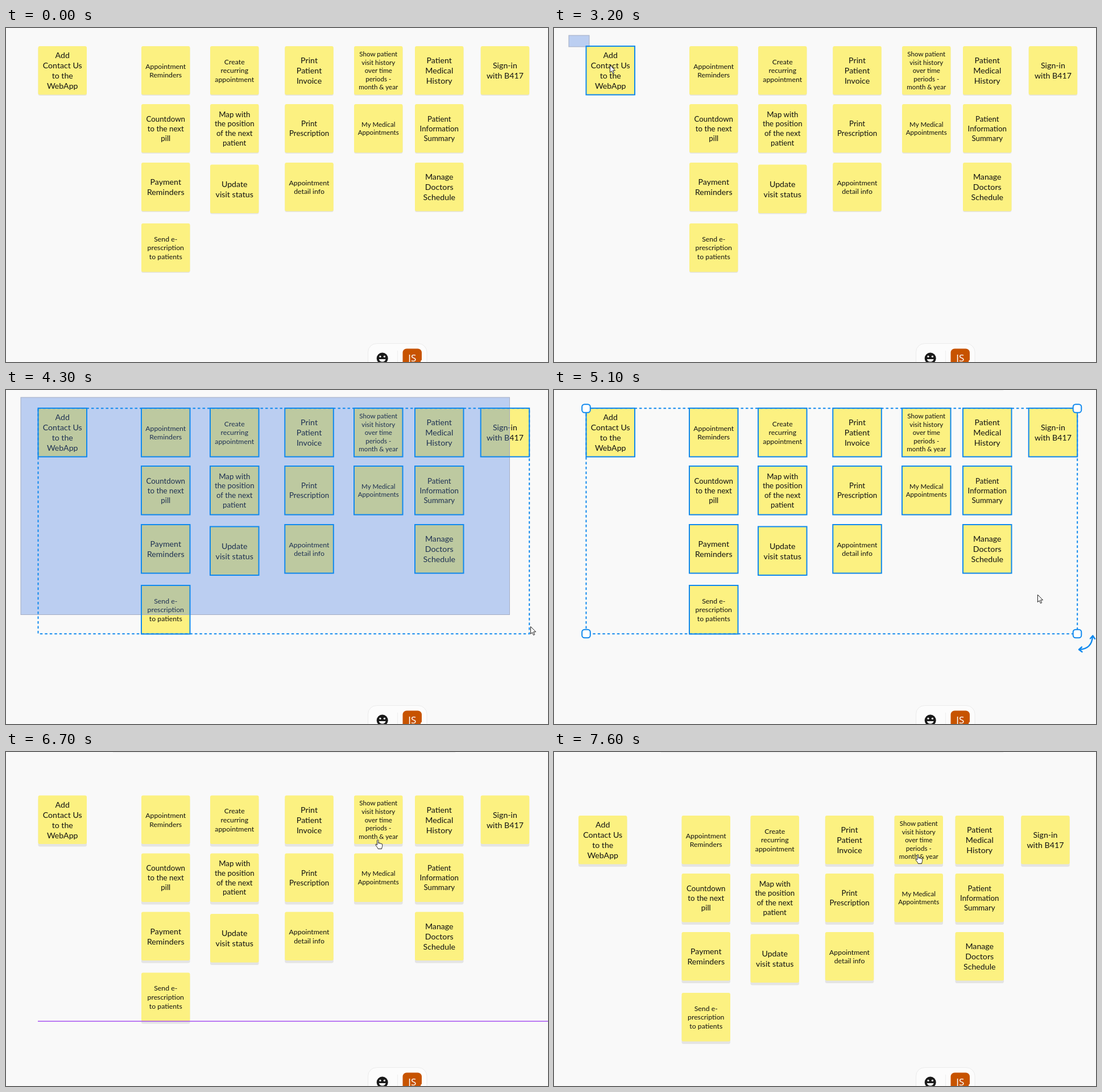
An HTML page that plays this animation: 953x588 px, repeating every 8000 ms.

```html
<!DOCTYPE html>
<html lang="en">
<head>
<meta charset="utf-8">
<title>Sticky note board</title>
<style>
  html, body { margin: 0; width: 100%; height: 100%; overflow: hidden; background: #f9f9f9; }
  svg { display: block; width: 953px; height: 588px; }
  text { font-family: Lato, "Open Sans", sans-serif; text-anchor: middle; fill: #111; }
  .note { fill: #fcf181; }
  .shade { fill: #e4e4e4; }
  .outline { fill: none; stroke: #1089ee; stroke-width: 2; }
  .outline.hover { stroke: #7fbdf3; }
  #group { fill: none; stroke: #1089ee; stroke-width: 2; stroke-dasharray: 4.5 4; }
  #marquee { fill: rgba(58, 115, 224, .32); stroke: #a4adc4; }
  #handles rect { fill: #fff; stroke: #1089ee; stroke-width: 2; }
  #turn { fill: none; stroke: #1089ee; stroke-width: 2.4; stroke-linecap: round; stroke-linejoin: round; }
  .cursor { fill: #fff; stroke: #222; stroke-width: 1; stroke-linejoin: round; }
  .initials { font: 17px "Noto Sans", "Open Sans", sans-serif; fill: #fff; }
</style>
</head>
<body>
<svg viewBox="0 0 953 588">
  <path id="topbar" d="M188 .5H790" stroke="#ececec" stroke-width="1.5"/>
  <g id="board"></g>

  <g id="toolbar">
    <rect x="636.5" y="555.5" width="103.5" height="60" rx="15" fill="#fcfcfc" stroke="#ebebeb"/>
    <path d="M688.5 568V588" stroke="#eee"/>
    <circle cx="661.7" cy="581.5" r="10" fill="#1a1a1a"/>
    <g fill="#fff">
      <circle cx="658" cy="578.3" r="1.6"/>
      <circle cx="665.4" cy="578.3" r="1.6"/>
      <path d="M655.8 583H667.6A6 5.4 0 0 1 655.8 583Z"/>
    </g>
    <rect x="697.5" y="564.5" width="33.5" height="34" rx="7" fill="#c75300"/>
    <circle cx="733" cy="588" r="4" fill="#fcfcfc"/>
    <text class="initials" x="714.3" y="587">JS</text>
  </g>

  <rect id="marquee"/>
  <g id="outlines"></g>
  <rect id="group"/>
  <g id="handles">
    <path id="turn" d="M923.5 457Q946 456 947 433M928 452.5L923 457L928.5 461M943 437.5L947.3 432.5L951 438"/>
  </g>
  <path id="guide" d="M56 474H953" stroke="#a64ff0" stroke-width="1.6"/>
  <path id="arrow" class="cursor" d="M.5 .5V13.5L3.4 10.7L5.5 15.5L7.6 14.6L5.5 9.8H9.6Z"/>
  <path id="hand" class="cursor" d="M3.5 10V1.8a1.2 1.2 0 0 1 2.4 0V7a1.2 1.2 0 0 1 2.4 0v.5a1.2 1.2 0 0 1 2.3 .2v.5a1.1 1.1 0 0 1 2.1 .3V11.5c0 2 -1 2.5 -1.2 5H5.2C5 14.5 2 12 .9 9.5c-.5 -1.3 1 -2 1.8 -.9Z"/>
</svg>

<script>
const LOOP = 8000, STEP = 100, SIDE = 85.5;
const $ = id => document.getElementById(id);

// Text sizes: [font size, line height]
const SIZES = { L: [14.2, 18], M: [13.3, 16.8], S: [12.3, 15.7], XS: [11.6, 14.6] };

const NOTES = [
  [56.5, 32, 'L', 'Add|Contact Us|to the|WebApp'],
  [238, 32, 'S', 'Appointment|Reminders'],
  [238, 134, 'M', 'Countdown|to the next|pill'],
  [238, 237, 'L', 'Payment|Reminders'],
  [238, 344, 'S', 'Send e-|prescription|to patients'],
  [359, 32, 'S', 'Create|recurring|appointment'],
  [359, 134, 'M', 'Map with|the position|of the next|patient'],
  [359, 240.5, 'L', 'Update|visit status'],
  [490.3, 32, 'L', 'Print|Patient|Invoice'],
  [490.3, 134, 'M', 'Print|Prescription'],
  [490.3, 237, 'S', 'Appointment|detail info'],
  [612, 32, 'XS', 'Show patient|visit history|over time|periods -|month & year'],
  [612, 134, 'XS', 'My Medical|Appointments'],
  [719, 32, 'L', 'Patient|Medical|History'],
  [719, 134, 'M', 'Patient|Information|Summary'],
  [719, 237, 'L', 'Manage|Doctors|Schedule'],
  [834.7, 32, 'L', 'Sign-in|with B417']
].map(([x, y, size, label]) => ({ x, y, size, lines: label.split('|') }));

// Keys: time, x, y
const POINTER = [
  [0, 900, 299], [700, 900, 299], [1000, 858, 350], [1100, 858, 350],
  [1300, 836, 362], [1500, 836, 362], [1600, 690, 315], [1700, 300, 190],
  [1800, 103, 128], [2000, 88, 96], [2300, 17, 19], [2400, 21, 16],
  [2700, 26, 13], [2800, 26, 13], [3000, 42, 21], [3100, 62, 33],
  [3200, 98, 65], [3600, 395, 230], [3700, 469, 269], [4200, 885.5, 395.5],
  [4300, 922, 416], [4600, 934, 426], [4700, 935, 427], [5000, 935, 427],
  [5100, 850, 360], [5500, 645, 107], [5600, 645, 107], [5800, 649, 100],
  [6000, 649, 100], [6700, 649, 154], [6900, 646, 168], [7300, 631, 179],
  [7600, 635, 180]
];
const SHIFT = [
  [6000, 0, 0], [6200, 0, 4], [6600, 0, 38], [6700, 0, 44.5], [6900, -3, 62],
  [7100, -12, 73], [7300, -17, 78], [7600, -13.5, 80]
];

function make(tag, attrs, parent) {
  const el = document.createElementNS('http://www.w3.org/2000/svg', tag);
  set(el, attrs);
  return parent.appendChild(el);
}

function set(el, attrs) {
  for (const k in attrs) el.setAttribute(k, attrs[k]);
}

function show(el, on) {
  el.style.display = on ? '' : 'none';
}

function track(keys, t) {
  const i = keys.findIndex(k => k[0] > t);
  if (i < 0) return keys[keys.length - 1].slice(1);
  if (i === 0) return keys[0].slice(1);
  const a = keys[i - 1], b = keys[i], f = (t - a[0]) / (b[0] - a[0]);
  return [a[1] + (b[1] - a[1]) * f, a[2] + (b[2] - a[2]) * f];
}

for (const n of NOTES) {
  const box = { x: n.x, y: n.y, width: SIDE, height: SIDE };
  const [size, lead] = SIZES[n.size];
  n.shade = make('rect', { ...box, rx: 3, class: 'shade' }, $('board'));
  make('rect', { ...box, rx: 3, class: 'note' }, $('board'));
  n.lines.forEach((line, i) => {
    const mid = n.y + SIDE / 2 + .3 + (i - (n.lines.length - 1) / 2) * lead;
    const el = make('text', { x: n.x + SIDE / 2, y: mid + size * .35, 'font-size': size }, $('board'));
    el.textContent = line;
  });
  n.outline = make('rect', { ...box, class: 'outline' }, $('outlines'));
}

for (const x of [56.5, 920]) for (const y of [32.5, 429])
  make('rect', { x: x - 7.3, y: y - 7.3, width: 14.6, height: 14.6, rx: 4.5 }, $('handles'));

function draw(t) {
  const between = (a, b) => t >= a && t < b;
  const dragging = t >= 6100;

  const [dx, dy] = track(SHIFT, t);
  set($('board'), { transform: `translate(${dx} ${dy})` });

  // The marquee trails the pointer by one step.
  const [mx, my] = track(POINTER, t - STEP);
  const sweeping = between(2900, 5100);
  show($('marquee'), sweeping);
  if (sweeping) set($('marquee'), {
    x: 26, y: 13, width: Math.max(0, mx - 26), height: Math.max(0, my - 13)
  });

  const picked = [];
  NOTES.forEach((n, i) => {
    const on = between(5100, 6100) || (sweeping && mx > n.x && my > n.y);
    const hover = i === 0 && between(1800, 2200);
    if (on) picked.push(n);
    show(n.outline, on || hover);
    n.outline.classList.toggle('hover', hover);
    set(n.outline, { rx: hover ? 3 : 0 });
    set(n.shade, { y: n.y + (dragging ? 4.5 : 1.5) });
  });

  show($('group'), picked.length > 1);
  if (picked.length > 1) {
    const xs = picked.map(n => n.x), ys = picked.map(n => n.y);
    const x = Math.min(...xs), y = Math.min(...ys);
    set($('group'), {
      x, y: y + .3,
      width: Math.max(...xs) + SIDE - x,
      height: Math.max(...ys) + SIDE - y - .6
    });
  }

  show($('handles'), between(5100, 6100));
  show($('topbar'), t >= 5100);
  show($('guide'), between(6700, 6800));

  const [px, py] = track(POINTER, t);
  const pointing = between(1800, 2200) || t >= 5700;
  show($('hand'), pointing);
  show($('arrow'), !pointing && t >= 100);
  set(pointing ? $('hand') : $('arrow'), { transform: `translate(${px} ${py})` });
}

function tick() {
  const t = performance.now() % LOOP;
  draw(Math.floor(t / STEP) * STEP);
  requestAnimationFrame(tick);
}
tick();
</script>
</body>
</html>
```
